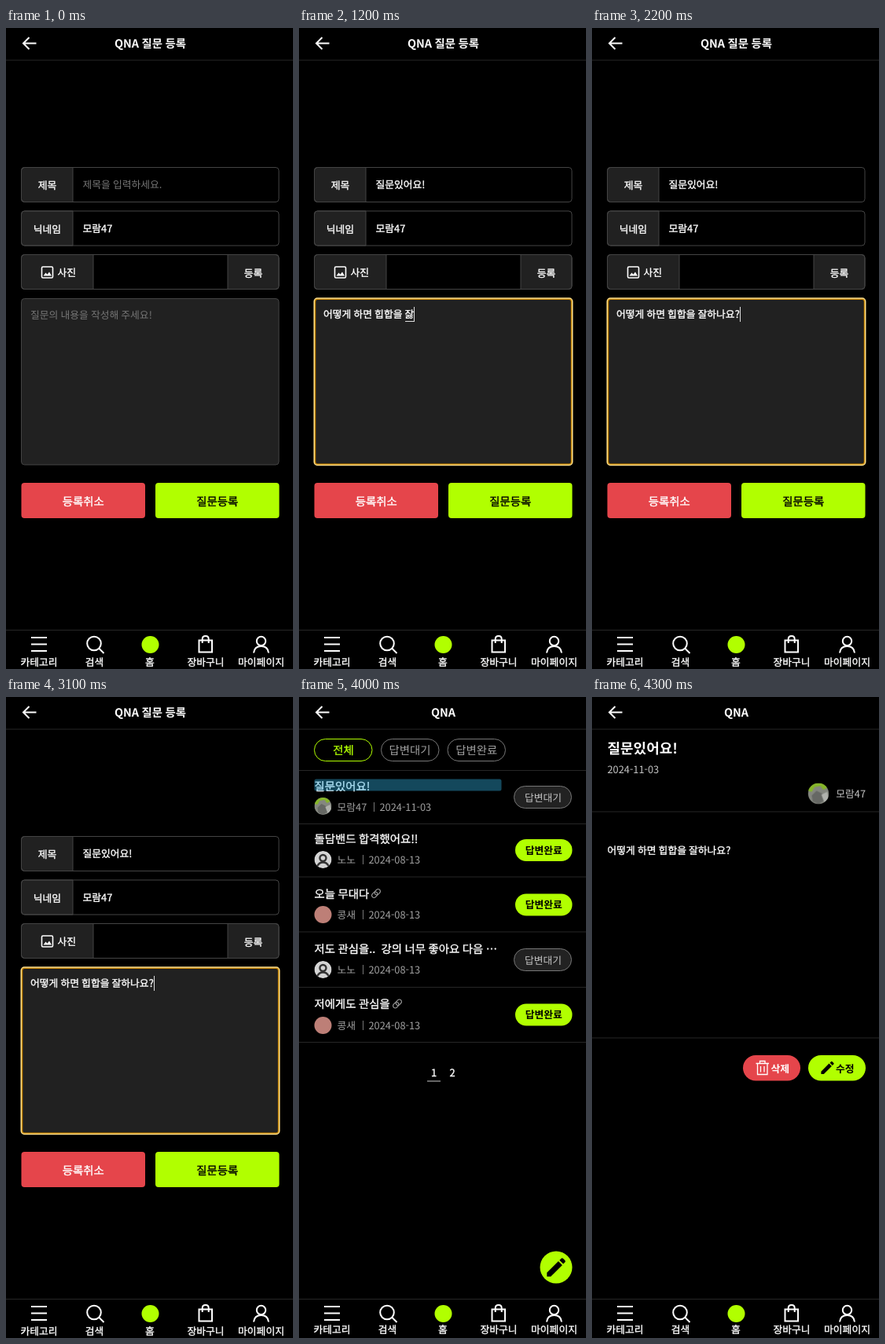
Animation of 365x816 px, one loop 5 s. Source, as an HTML page:

```html
<!DOCTYPE html>
<html lang="ko">
<head>
<meta charset="utf-8">
<title>QNA</title>
<style>
  html, body { margin: 0; width: 100%; height: 100%; overflow: hidden; background: #000; }
  body { position: relative; font: 12.8px "Noto Sans CJK KR", "Noto Sans KR", sans-serif; color: #fff; word-spacing: -.036em; text-rendering: geometricPrecision; }
  svg { position: absolute; left: 0; top: 0; display: block; }
  text { fill: currentColor; white-space: pre; }
  .m { text-anchor: middle; }
  .end { text-anchor: end; }
  /* medium weight: regular with a thin stroke */
  .md { stroke: currentColor; stroke-width: .35px; }
  .entry { -webkit-text-stroke: .35px currentColor; }
  .b { font-weight: 700; }
  .big { font-size: 14.4px; }
  .dim { color: #a0a0a0; }
  .hint { color: #767676; }
  .soft { color: #c4c4c4; }
  .dark { color: #000; }
  .panel { fill: #212121; stroke: #444; }
  .frame { fill: none; stroke: #444; }
  .rule { stroke: #262626; fill: none; }
  .ico { fill: none; stroke: #fff; stroke-width: 2; }
  .lime { fill: #b1ff00; color: #b1ff00; }
  .red { fill: #e5454b; }
  .wait { fill: #222; stroke: #777; }

  .form, .list, .detail, .blank, .typing, .tap, .photo, .labels, .caret,
  .typed::before, .typed::after { animation: 5s step-end infinite; }
  .form { animation-name: form; }
  .list { animation-name: list; }
  .detail { animation-name: detail; }
  .blank { animation-name: blank; }
  .typing { animation-name: typing; }
  .tap { animation-name: tap; }
  .photo { animation-name: photo; }
  .labels { animation-name: labels; }
  @keyframes form { 0% { opacity: 1 } 64%, 100% { opacity: 0 } }
  @keyframes list { 0% { opacity: 0 } 64% { opacity: 1 } 84%, 100% { opacity: 0 } }
  @keyframes detail { 0% { opacity: 0 } 84%, 100% { opacity: 1 } }
  @keyframes blank { 0% { opacity: 1 } 14%, 100% { opacity: 0 } }
  @keyframes typing { 0% { opacity: 0 } 14% { opacity: 1 } 64%, 100% { opacity: 0 } }
  @keyframes tap { 0% { opacity: 0 } 80% { opacity: 1 } 84%, 100% { opacity: 0 } }
  @keyframes photo { 0% { opacity: 0 } 86%, 100% { opacity: 1 } }
  @keyframes labels { 0% { transform: translateY(2px) } 64%, 100% { transform: none } }

  /* committed text, then the syllable being composed */
  .entry { position: absolute; left: 31px; top: 354px; line-height: 20px; white-space: pre; }
  .typed::before { content: "어떻게 하면 힙합을 "; animation-name: done; }
  .typed::after { content: ""; border-bottom: 1px solid #ddd; animation-name: compose; }
  .caret { position: absolute; top: 1px; width: 1px; height: 19px; background: #ddd; animation-name: blink; }
  @keyframes done {
    0% { content: "어떻게 하면 힙합을 " }
    26% { content: "어떻게 하면 힙합을 잘" }
    30% { content: "어떻게 하면 힙합을 잘하" }
    34% { content: "어떻게 하면 힙합을 잘하나" }
    40% { content: "어떻게 하면 힙합을 잘하나요" }
    42%, 100% { content: "어떻게 하면 힙합을 잘하나요?" }
  }
  @keyframes compose {
    0% { content: "ㅈ" }
    18% { content: "자" }
    22% { content: "잘" }
    24% { content: "잟" }
    26% { content: "하" }
    28% { content: "한" }
    30% { content: "나" }
    32% { content: "낭" }
    34% { content: "요" }
    40%, 100% { content: "" }
  }
  @keyframes blink { 0% { opacity: 1 } 52% { opacity: .5 } 54% { opacity: 0 } 62%, 100% { opacity: 1 } }
</style>
</head>
<body>
<svg width="365" height="816" viewBox="0 0 365 816">
  <defs>
    <clipPath id="round"><circle r="11"/></clipPath>
    <g id="photo" clip-path="url(#round)">
      <circle r="11" fill="#84877f"/>
      <path d="M-11-11H9V-6L5-4 2-8-4-7-7-2-11-3Z" fill="#86b52a"/>
      <path d="M-7 2-2-3 4 0 6 7 0 11-6 8Z" fill="#666864"/>
      <path d="M3 1 9-2 11 6 6 9Z" fill="#b0b2ad"/>
    </g>
    <g id="person" clip-path="url(#round)">
      <circle r="11" fill="#d4d4d4"/>
      <circle cy="-2" r="4" fill="none" stroke="#333" stroke-width="2.4"/>
      <path d="M-7 8Q-5 3.5 0 3.5T7 8" fill="none" stroke="#333" stroke-width="2.4"/>
    </g>
    <circle id="pink" r="11" fill="#bd7f77"/>
    <g id="link" fill="none" stroke="#999" stroke-width="1.2" transform="rotate(-45)">
      <rect x="-6.500" y="-2.800" width="8" height="5.600" rx="2.800"/>
      <rect x="-1.500" y="-2.800" width="8" height="5.600" rx="2.800"/>
    </g>
    <path id="pencil" d="M-9 9V5.200L2.200-6 6-2.200-5.200 9ZM3.300-7 5-8.700Q5.900-9.500 6.800-8.700L8.700-6.800Q9.500-5.900 8.700-5L7-3.300Z"/>
    <rect id="wait" class="wait" x="273.5" y="-14" width="73" height="28" rx="14"/>
    <rect id="ok" class="lime" x="275" y="-14" width="72.5" height="28" rx="14"/>
  </defs>

  <rect width="365" height="816"/>
  <path class="rule" d="M0 41H365M0 766.5H365"/>
  <path class="ico" d="M29.500 12 22 19.500 29.500 27M22 19.500H38.500"/>

  <g class="form">
    <text class="m big b" x="183.5" y="24.7">QNA 질문 등록</text>

    <path class="panel" d="M85 177.500H23.500Q19.500 177.500 19.500 181.500V217.500Q19.500 221.500 23.500 221.500H85Z"/>
    <rect class="frame" x="19.5" y="177.5" width="327.5" height="44" rx="4"/>
    <text class="m md" x="52.5" y="204.7">제목</text>
    <text class="hint blank" x="97.5" y="203.7">제목을 입력하세요.</text>
    <text class="md typing" x="97.5" y="203.7">질문있어요!</text>

    <path class="panel" d="M85 233H23.500Q19.500 233 19.500 237V273Q19.500 277 23.500 277H85Z"/>
    <rect class="frame" x="19.5" y="233" width="327.5" height="44" rx="4"/>
    <text class="m md" x="52.5" y="260.5">닉네임</text>
    <text class="md" x="97.5" y="259.7">모람47</text>

    <path class="panel" d="M111 288.500H23.500Q19.500 288.500 19.500 292.500V328.500Q19.500 332.500 23.500 332.500H111ZM282 288.500H343Q347 288.500 347 292.500V328.500Q347 332.500 343 332.500H282Z"/>
    <rect class="frame" x="19.5" y="288.5" width="327.5" height="44" rx="4"/>
    <rect class="ico" x="45.5" y="304" width="14" height="14" rx="1.5" style="stroke-width:1.6"/>
    <path d="M47.500 315.500 50.500 311.500 52.500 313.800 55 310.500 58 315.500Z" fill="#fff"/>
    <text class="md" x="65.5" y="315.5">사진</text>
    <text class="m md" x="314.5" y="316.5">등록</text>

    <rect class="panel" x="19.5" y="344.5" width="327.5" height="211.5" rx="4"/>
    <text class="hint blank" x="31" y="369.6">질문의 내용을 작성해 주세요!</text>
    <g class="typing" fill="none" stroke-width="1.5">
      <rect x="20.5" y="345.3" width="326" height="210" rx="3" stroke="#c98500"/>
      <rect x="19.3" y="344.1" width="328.4" height="212.4" rx="4" stroke="#ffe08a"/>
    </g>

    <rect class="red" x="19.5" y="579" width="157.5" height="45" rx="4"/>
    <text class="m big md" x="98.3" y="607.7">등록취소</text>
    <rect class="lime" x="190" y="579" width="157.5" height="45" rx="4"/>
    <text class="m big md dark" x="268.7" y="607.7">질문등록</text>
  </g>

  <g class="list">
    <text class="m big b" x="183.5" y="24.7">QNA</text>
    <g fill="none" stroke="#777">
      <rect x="19.5" y="53.5" width="73.5" height="28" rx="14" stroke="#b1ff00"/>
      <rect x="104.5" y="53.5" width="73.5" height="28" rx="14"/>
      <rect x="189" y="53.5" width="73.5" height="28" rx="14"/>
    </g>
    <text class="m big md lime" x="56.5" y="72.7">전체</text>
    <text class="m big dim" x="141" y="72.7">답변대기</text>
    <text class="m big dim" x="225.7" y="72.7">답변완료</text>
    <path class="rule" d="M0 93.500H365M0 161.500H365M0 229H365M0 299H365M0 369.500H365M0 439.500H365"/>
    <path d="M95.500 134V146M81.500 201V213M81.500 271V283M81.500 341V353M81.500 412V424" stroke="#777"/>

    <g class="big md">
      <text x="19.5" y="118.5">질문있어요!</text>
      <text x="19.5" y="185.7">돌담밴드 합격했어요!!</text>
      <text x="19.5" y="255.7">오늘 무대다</text>
      <text x="19.5" y="325.7">저도 관심을..  강의 너무 좋아요 다음 …</text>
      <text x="19.5" y="396.2">저에게도 관심을</text>
    </g>
    <rect class="tap" x="19.5" y="104.5" width="238" height="15" rx="2.5" fill="#33b5e5" fill-opacity=".4"/>
    <use href="#link" transform="translate(98 250)"/>
    <use href="#link" transform="translate(125 390.5)"/>

    <use href="#photo" x="30.5" y="139"/>
    <use href="#person" x="30.5" y="207"/>
    <use href="#pink" x="30.5" y="277"/>
    <use href="#person" x="30.5" y="347"/>
    <use href="#pink" x="30.5" y="418"/>
    <g class="dim">
      <text x="48.5" y="144.7">모람47</text>
      <text x="102.5" y="144.7">2024-11-03</text>
      <text x="48.5" y="211.7">노노</text>
      <text x="88.5" y="211.7">2024-08-13</text>
      <text x="48.5" y="281.7">콩새</text>
      <text x="88.5" y="281.7">2024-08-13</text>
      <text x="48.5" y="351.7">노노</text>
      <text x="88.5" y="351.7">2024-08-13</text>
      <text x="48.5" y="422.7">콩새</text>
      <text x="88.5" y="422.7">2024-08-13</text>
    </g>

    <use href="#wait" y="127.5"/>
    <use href="#ok" y="195"/>
    <use href="#ok" y="264.5"/>
    <use href="#wait" y="334.5"/>
    <use href="#ok" y="404.5"/>
    <text class="m soft" x="310.5" y="132.5">답변대기</text>
    <text class="m b dark" x="311.3" y="199.7">답변완료</text>
    <text class="m b dark" x="311.3" y="269.2">답변완료</text>
    <text class="m soft" x="310.5" y="339.5">답변대기</text>
    <text class="m b dark" x="311.3" y="409.2">답변완료</text>

    <text class="m md" x="171.5" y="483">1</text>
    <text class="m md" x="195" y="483">2</text>
    <path d="M163 489H180" stroke="#ccc"/>
    <circle class="lime" cx="327" cy="726" r="20.5"/>
    <use href="#pencil" transform="translate(327 726) scale(1.3)"/>
  </g>

  <g class="detail">
    <text class="m big b" x="183.5" y="24.7">QNA</text>
    <text class="b" x="19.5" y="71.7" style="font-size:18px">질문있어요!</text>
    <text class="soft" x="19.5" y="96.7">2024-11-03</text>
    <g class="photo"><use href="#photo" transform="translate(288 123) scale(1.22)"/></g>
    <text class="end soft" x="348" y="127.7">모람47</text>
    <path class="rule" d="M0 146H365M0 434H365"/>
    <text class="md" x="19.5" y="199.7">어떻게 하면 힙합을 잘하나요?</text>
    <rect class="red" x="192" y="456" width="73" height="32.5" rx="16.2"/>
    <path class="ico" d="M208.500 466.500H225M213.500 466V463.500H220V466M210.500 467V480.500H223V467M214.500 470V477.500M219 470V477.500" style="stroke-width:1.3"/>
    <text class="b" x="227.5" y="477.5">삭제</text>
    <rect class="lime" x="275" y="456" width="73" height="32.5" rx="16.2"/>
    <use href="#pencil" transform="translate(299.5 472) scale(.9)"/>
    <text class="b dark" x="310" y="477.5">수정</text>
  </g>

  <g class="ico">
    <path d="M32 776H52M32 784.500H52M32 793H52"/>
    <circle cx="112" cy="783.5" r="8.8"/>
    <path d="M118.500 790 124.500 796"/>
    <path d="M245.500 779.500H262V794.500H245.500ZM249.700 783V778Q249.700 774 253.700 774T257.700 778V783"/>
    <circle cx="324.5" cy="780.5" r="5.7"/>
    <path d="M315 795.500Q316 787 324.500 787T334 795.500"/>
  </g>
  <circle class="lime" cx="183.5" cy="785" r="11"/>
  <g class="labels m md">
    <text x="42" y="809.7">카테고리</text>
    <text x="112.5" y="809.7">검색</text>
    <text x="183" y="809.7">홈</text>
    <text x="254" y="809.7">장바구니</text>
    <text x="324.5" y="809.7">마이페이지</text>
  </g>
</svg>
<div class="entry typing"><span class="typed"></span><i class="caret"></i></div>
</body>
</html>
```
